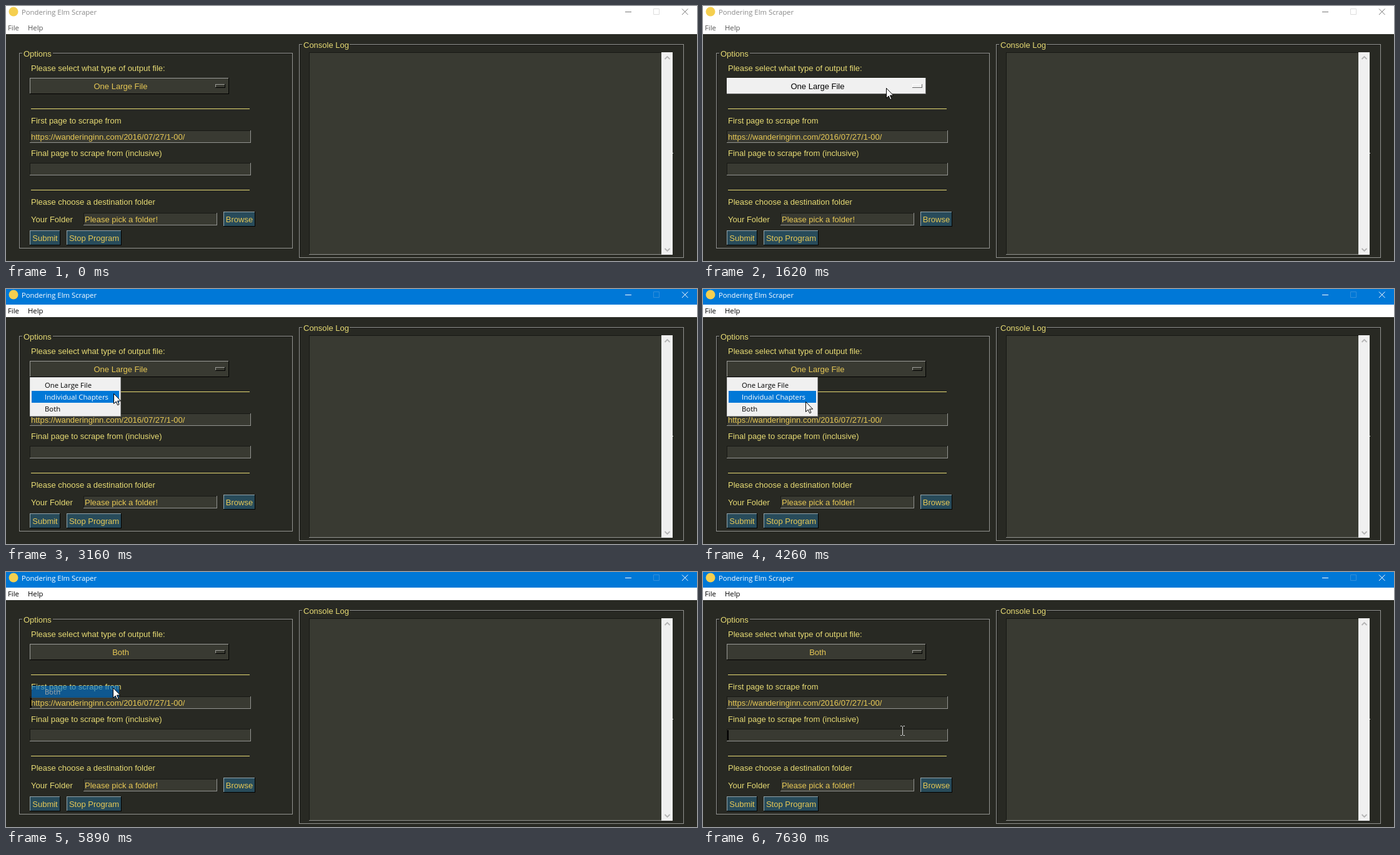
An HTML page that plays this animation: 1106 px wide and 408 px high, repeating every 8000 ms.

```html
<!DOCTYPE html>
<html lang="en">
<head>
<meta charset="utf-8">
<title>Pondering Elm Scraper</title>
<style>
  html, body { margin: 0; width: 100%; height: 100%; overflow: hidden; background: #282923; }
  svg { display: block; width: 1106px; height: 408px; }
  rect { shape-rendering: crispEdges; }
  text { font: 13px "Liberation Sans", Arial, sans-serif; white-space: pre; }
  text.ui { font: 11.3px "Open Sans", "Noto Sans", sans-serif; }
</style>
</head>
<body>
<svg id="stage" viewBox="0 0 1106 408"></svg>
<script>
const LOOP = 8000, OPEN = 1850, PICKED = 5890, TICK = 78;
const BG = '#282923', FIELD = '#393a32', LABEL = '#e7db74', AMBER = '#e7c855';
const TEAL = '#284b5a', LIGHT = '#939491', SHADE = '#181815', BLUE = '#0078d7', FACE = '#f0f0f0';

const stage = document.getElementById('stage');

function add(tag, attrs, parent = stage) {
  const el = document.createElementNS('http://www.w3.org/2000/svg', tag);
  for (const k in attrs) el.setAttribute(k, attrs[k]);
  parent.appendChild(el);
  return el;
}
const rect = (x, y, width, height, fill, parent) => add('rect', { x, y, width, height, fill }, parent);
const line = (d, stroke, w = 1) => add('path', { d, stroke, 'stroke-width': w, fill: 'none' });

function text(str, x, y, fill, parent, extra = {}) {
  const el = add('text', { x, y, fill, ...extra }, parent);
  el.textContent = str;
  return el;
}
const ui = (str, x, y, fill, parent) => text(str, x, y, fill, parent, { class: 'ui' });
const centred = (str, x, y, fill, parent) => text(str, x, y, fill, parent, { 'text-anchor': 'middle' });

// Filled box with one edge colour at top and left, another at bottom and right.
function bevel(x, y, w, h, fill, topLeft, bottomRight, parent) {
  rect(x, y, w, h, bottomRight, parent);
  rect(x, y, w - 1, h - 1, topLeft, parent);
  rect(x + 1, y + 1, w - 2, h - 2, fill, parent);
}

function frame(x, y, w, h, label, labelWidth) {
  rect(x, y, w, h, LIGHT);
  bevel(x + 1, y + 1, w - 2, h - 2, BG, SHADE, BG);
  rect(x + 5, y - 4, labelWidth, 12, BG);
  text(label, x + 7, y + 6, LABEL);
}

function field(x, y, w, value) {
  bevel(x, y, w, 20, FIELD, SHADE, LIGHT);
  text(value, x + 2, y + 15, AMBER);
}

function button(x, y, w, label) {
  bevel(x, y, w, 24, TEAL, '#93a5ac', '#000');
  centred(label, x + w / 2, y + 17, AMBER);
}

// Title bar and menu bar
const titleBar = rect(0, 0, 1106, 25, '#fff');
add('circle', { cx: 12, cy: 9, r: 7.5, fill: '#f5cf4f' });
const title = ui('Pondering Elm Scraper', 25, 14);
const minimise = line('M991 9.5h10');
const maximise = line('M1036.5 4.5h9v9h-9z');
const close = line('M1082 4.5l9.5 9.5m0 -9.5l-9.5 9.5');
rect(0, 25, 1106, 20, '#fff');
const menus = [ui('File', 3, 39), ui('Help', 35, 39)];

// Options
frame(21, 75, 438, 313, 'Options', 49);
text('Please select what type of output file:', 40, 104, LABEL);

function chooser(fill, ink, light, dark) {
  const g = add('g');
  bevel(38, 115, 319, 26, fill, light, dark, g);
  bevel(335, 125, 16, 6, fill, light, dark, g);
  return { g, label: centred('', 183.5, 133, ink, g) };
}
const idle = chooser(FIELD, AMBER, '#9c9c98', '#000');
const hover = chooser(FACE, '#000', '#fff', '#696969');

for (const y of [164, 294]) rect(40, y, 350, 1, LABEL);
text('First page to scrape from', 40, 188, LABEL);
field(38, 199, 354, 'https://wanderinginn.com/2016/07/27/1-00/');
text('Final page to scrape from (inclusive)', 40, 240, LABEL);
field(38, 251, 354, '');
text('Please choose a destination folder', 40, 318, LABEL);
text('Your Folder', 40, 346, LABEL);
field(124, 331, 214, 'Please pick a folder!');
button(348, 329, 51, 'Browse');
button(38, 359, 49, 'Submit');
button(97, 359, 88, 'Stop Program');

// Console
frame(469, 61, 616, 342, 'Console Log', 76);
bevel(485, 74, 565, 324, FIELD, SHADE, LIGHT);
rect(1049, 74, 18, 324, FACE);
line('M1054.5 85l4 -4l4 4M1054.5 388l4 4l4 -4', '#b4b4b4', 1.8);
rect(1066, 235, 2, 1, '#fff');

const caret = rect(39, 201, 2, 16, '#000');

// Drop-down list
const ROW = 19, rowTop = (i) => 144 + ROW * i;
const names = ['One Large File', 'Individual Chapters', 'Both'];
const popup = add('g');
bevel(38, 141, 146, 63, FACE, '#ccc', '#a0a0a0', popup);
const bar = rect(41, 0, 140, ROW, BLUE, popup);
const items = names.map((s, i) => ui(s, 62, rowTop(i) + 14, '#000', popup));

const fading = add('g', { opacity: 0.6 });
rect(41, rowTop(2), 140, ROW, BLUE, fading);
ui(names[2], 62, rowTop(2) + 14, '#fff', fading);

// Pointer
const ring = add('circle', { r: 12, fill: '#ff0', 'fill-opacity': 0.47 });
const arrow = add('path', {
  d: 'M.5 .5V16.5L4.2 13L6.7 18.7L9 17.7L6.5 12.1H11.7Z', fill: '#fff', stroke: '#000'
});
const beam = line('M-3 -7.5h2.5m2 0h2.5M.5 -7v14M-3 7.5h2.5m2 0h2.5', '#ddd');

// Key points of the pointer: when it sets off, and where to
const path = [
  [210, 405, 191], [1070, 293, 131], [1700, 288, 131], [1920, 170, 158],
  [2780, 172, 167], [3390, 170, 187], [4110, 164, 180], [4580, 164, 159],
  [5050, 171, 185], [5970, 303, 218], [7070, 319, 254]
];
// Clicks: time, then the caret's place from there on
const clicks = [[1650, 39, 201], [5740, 39, 201], [6610, 285, 201], [7390, 39, 253]];

const inside = (p, x, y, w, h) => p.x >= x && p.x < x + w && p.y >= y && p.y < y + h;
const show = (el, on) => el.setAttribute('visibility', on ? 'visible' : 'hidden');
const paint = (el, colour, attr = 'fill') => el.setAttribute(attr, colour);

// Even motion in discrete ticks; longer ways take longer.
function pointerAt(t) {
  let p = { x: 965, y: 400 };
  for (const [start, x, y] of path) {
    if (t < start) break;
    const dx = x - p.x, dy = y - p.y;
    const span = Math.min(780, Math.max(150, 4.6 * Math.hypot(dx, dy)));
    const f = Math.min(1, (Math.floor((t - start) / TICK) + 1) * TICK / span);
    p = { x: Math.round(p.x + dx * f), y: Math.round(p.y + dy * f) };
  }
  return p;
}

function drawWindow(active) {
  paint(titleBar, active ? BLUE : '#fff');
  paint(title, active ? '#fff' : '#888');
  for (const icon of [minimise, close]) paint(icon, active ? '#fff' : '#777', 'stroke');
  paint(maximise, active ? '#338fdb' : '#ddd', 'stroke');
  for (const m of menus) paint(m, active ? '#000' : '#555');
}

function drawChooser(t, p) {
  const over = inside(p, 38, 115, 319, 26);
  const open = t >= OPEN && t < PICKED;
  for (const c of [idle, hover]) {
    show(c.g, over === (c === hover));
    c.label.textContent = names[t < PICKED ? 0 : 2];
  }
  const row = inside(p, 38, rowTop(0), 146, 3 * ROW) ? Math.floor((p.y - rowTop(0)) / ROW) : -1;
  show(popup, open);
  show(bar, open && row >= 0);
  bar.setAttribute('y', rowTop(row));
  items.forEach((el, i) => paint(el, i === row ? '#fff' : '#000'));
  show(fading, t >= PICKED && t < PICKED + TICK);
  return open;
}

function drawPointer(t, p, open) {
  const click = clicks.findLast(c => t >= c[0]);
  const since = click ? t - click[0] : Infinity;
  show(caret, t >= OPEN && since % 900 < 600);
  if (click) {
    caret.setAttribute('x', click[1]);
    caret.setAttribute('y', click[2]);
  }
  const typing = inside(p, 485, 74, 564, 324) || inside(p, 38, 251, 354, 20) ||
    (!open && inside(p, 38, 199, 354, 20));
  for (const el of [arrow, beam, ring]) el.setAttribute('transform', `translate(${p.x} ${p.y})`);
  show(arrow, t >= path[0][0] && !typing);
  show(beam, typing);
  show(ring, since < 150);
}

const begin = performance.now();
function tick() {
  const t = (performance.now() - begin) % LOOP;
  const p = pointerAt(t);
  drawWindow(t >= OPEN);
  drawPointer(t, p, drawChooser(t, p));
  requestAnimationFrame(tick);
}
tick();
</script>
</body>
</html>
```
